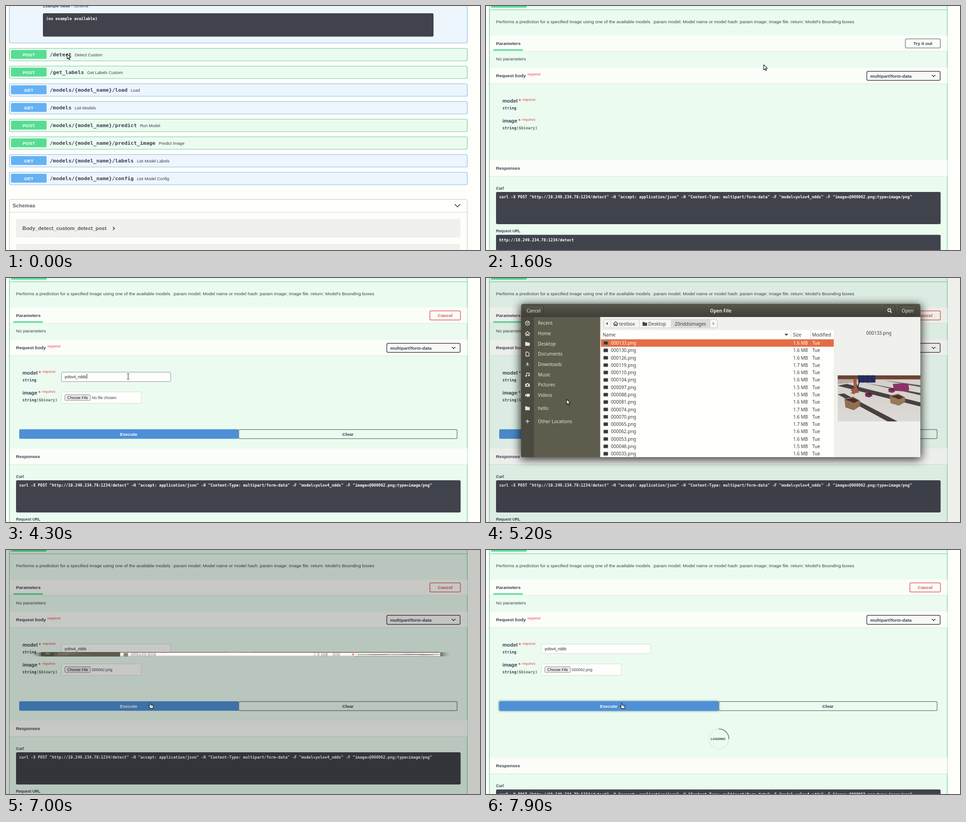
Write an HTML page that moves like this. It is 1040 px wide and 538 px high and loops after 8 s.

```html
<!DOCTYPE html>
<html lang="en">
<head>
<meta charset="utf-8">
<title>API docs demo</title>
<style>
  html, body { margin: 0; width: 100%; height: 100%; overflow: hidden; background: #fefefa; }
  svg { display: block; width: 1040px; height: 538px; font-family: "Liberation Sans", Arial, sans-serif; fill: #3b4151; }
  .b { font-weight: 700; }
  .m { font-family: "DejaVu Sans Mono", monospace; font-weight: 700; }
  .mid { text-anchor: middle; }
  .white { fill: #fff; }
  .req { fill: #ef686b; font-weight: 700; }
  .star { fill: #dc3a3c; font-weight: 700; }
  .ui { font-family: "Noto Sans", "Open Sans", sans-serif; fill: #3c3c3a; }
  .light { fill: #e6e4da; }
  .line { fill: none; stroke-linecap: round; stroke-linejoin: round; }
  .glow { filter: blur(2px); }
  .shadow { filter: blur(10px); }
</style>
</head>
<body>
<svg id="stage" viewBox="0 0 1040 538" xml:space="preserve"></svg>
<script>
const LOOP = 8000, STEP = 100;
const POST = '#57dd93', GET = '#65b1f3', POST_BG = '#ebfbf0', GET_BG = '#edf5fd';
const POST_LINE = '#6bcb9d', GET_LINE = '#82bcea', CODE = '#40434b', PAGE = '#fefefa';

// Markup helpers
const rect = (x, y, w, h, fill, more = '') =>
  `<rect x="${x}" y="${y}" width="${w}" height="${h}" fill="${fill}" ${more}/>`;
const box = (x, y, w, h, fill, stroke, sw = 1, r = 3, more = '') =>
  rect(x, y, w, h, fill, `stroke="${stroke}" stroke-width="${sw}" rx="${r}" ${more}`);
const text = (x, y, s, size, cls = '', more = '') =>
  `<text x="${x}" y="${y}" font-size="${size}" class="${cls}" ${more}>${s}</text>`;
const path = (d, stroke, w = 1.4) => `<path class="line" d="${d}" stroke="${stroke}" stroke-width="${w}"/>`;
const shape = (d, fill) => `<path d="${d}" fill="${fill}"/>`;
const group = (id, body, more = '') => `<g id="${id}" ${more}>${body}</g>`;
const at = (x, y, body) => `<g transform="translate(${x} ${y})">${body}</g>`;

// API page
const ops = [
  ['POST', '/detect', 'Detect Custom'],
  ['POST', '/get_labels', 'Get Labels Custom'],
  ['GET', '/models/{model_name}/load', 'Load'],
  ['GET', '/models', 'List Models'],
  ['POST', '/models/{model_name}/predict', 'Run Model'],
  ['POST', '/models/{model_name}/predict_image', 'Predict Image'],
  ['GET', '/models/{model_name}/labels', 'List Model Labels'],
  ['GET', '/models/{model_name}/config', 'List Model Config']
];

const opHead = ([verb, url, note], y) =>
  rect(11, y + 4, 78, 19.5, verb === 'POST' ? POST : GET, 'rx="2"') +
  text(50, y + 17.5, verb, 9.91, 'b mid white') +
  text(96, y + 18, url, 11.33, 'm') +
  text(103 + url.length * 6.82, y + 17.5, note, 9.2);

const opRow = (op, i) => {
  const y = Math.round(93 + 38.93 * i), post = op[0] === 'POST';
  return box(7.5, y + .5, 1004.5, 27.5, post ? POST_BG : GET_BG, post ? POST_LINE : GET_LINE, 1.2) + opHead(op, y);
};

const exampleBlock = () =>
  box(7.5, -20, 1004.5, 101.5, GET_BG, GET_LINE, 1.2) +
  text(81, 3, 'Example Value', 8.5, 'b') + rect(144, -5, .8, 9, '#b5b9c0') + text(149, 3, 'Schema', 8.5) +
  rect(81, 16, 857, 51.5, CODE, 'rx="3"') +
  text(88, 31, '(no example available)', 8.5, 'm white');

const schemas = () =>
  box(7.5, 426.5, 1004.5, 140, PAGE, '#c6c7c5') + rect(8, 454.5, 1004, 1, '#cfd0ce') +
  text(14.5, 444, 'Schemas', 11.33, 'b', 'fill="#5b5e66"') +
  path('M985 437.5l5.5 5.5 5.5-5.5', '#2b2b2b', 1.5) +
  rect(22, 469.5, 975, 41, '#f0f1ee', 'rx="3"') + rect(22, 524.5, 975, 41, '#f0f1ee', 'rx="3"') +
  text(36, 493.5, 'Body_detect_custom_detect_post', 11.33, 'b', 'fill="#58595d"') +
  path('M235 487.5l3 3-3 3', '#2b2b2b', 1.5);

const band = (y, h, title) =>
  rect(8, y + h, 1004, 1, '#d6e6db') + rect(8, y, 1004, h, '#fbfdf9') + text(22, y + 21, title, 9.91, 'b');

const button = (x, w, y, label, color, ink) =>
  box(x, y, w, 20, 'none', color, 1.5, 2.5) + text(x + w / 2, y + 13.7, label, 9.91, 'b mid', `fill="${ink}"`);

const field = (y, name, width, type, extra = '') =>
  text(36, y, name, 11.33, 'b') + text(38.5 + width, y, '*', 11.33, 'star') +
  text(46.7 + width, y - 4.5, 'required', 7.08, 'req') +
  text(36, y + 14.5, type + `<tspan fill="#666">${extra}</tspan>`, 8.5, 'm');

const detail = () =>
  box(7.5, -19.5, 1004.5, 800, POST_BG, POST_LINE, 1.2) + opHead(ops[0], -20) +
  rect(8, 8, 1004, 1, POST_LINE) +
  text(22, 38, "Performs a prediction for a specified image using one of the available models. :param model: Model name or model hash :param image: Image file :return: Model's Bounding boxes", 9.91) +
  band(65, 34.5, 'Parameters') + rect(16, 95.5, 65, 3, '#4fdb8f') +
  text(22, 120, 'No parameters', 9.91) +
  band(136, 35, 'Request body') + text(91, 153, 'required', 7.08, 'req') +
  box(835.5, 144, 161, 20, '#f8f9f6', '#41444e', 1.5) +
  text(843, 157.5, 'multipart/form-data', 9.91, 'b') + path('M978.5 152.5l3.5 3.3 3.5-3.3', '#2b2b2b') +
  field(213, 'model', 33.4, 'string') + field(257, 'image', 32.7, 'string', '($binary)') +
  group('tryBtn', button(920.2, 76.6, 72.5, 'Try it out', '#858686', '#3b4151')) +
  group('form', form()) + group('lower', responses());

const form = () =>
  button(930, 67, 72.5, 'Cancel', '#dd6464', '#d9585b') +
  box(121.5, 207.5, 240, 21, '#fefefc', '#d6dad6', 1, 2.5, 'id="input"') +
  text(128.5, 220.5, 'model', 8.5, '', 'id="value"') + rect(129, 211, 1, 11, '#222', 'id="caret"') +
  box(121.5, 251, 175.5, 25.5, '#fefefc', '#d6dad6', 1, 2.5) +
  box(129, 257.5, 56, 12.5, '#efefef', '#777', .9, 1.8) + text(157, 266.7, 'Choose File', 8.5, 'mid', 'fill="#111"') +
  text(188.3, 266.5, 'No file chosen', 8.5, '', 'id="file"') +
  rect(28, 333, 483, 22, '#3b5f80', 'id="focus" class="glow" opacity=".7" rx="3"') +
  rect(29, 333.5, 481.5, 21, '#4d90d6', 'rx="2.5"') + text(269, 347.5, 'Execute', 9.91, 'b mid white') +
  button(510.7, 479, 334.2, 'Clear', '#858080', '#3b4151') +
  group('loading',
    '<circle cx="511" cy="416.5" r="22" fill="none" stroke="#dcebe1" stroke-width="1.6"/>' +
    path('M511 394.5A22 22 0 0 1 533 416.5', '#6b716e', 1.6) +
    text(509.3, 418.5, 'LOADING', 7.08, 'b mid'));

const responses = () =>
  band(376, 35, 'Responses') + text(22, 440.5, 'Curl', 8.5, 'b') +
  rect(22, 446, 975.5, 71, CODE, 'rx="3"') +
  text(29, 460, 'curl -X POST "http://10.249.234.78:1234/detect" -H "accept: application/json" -H "Content-Type: multipart/form-data" -F "model=yolov4_ndds" -F "image=@000062.png;type=image/png"', 8.5, 'm white') +
  text(22, 535, 'Request URL', 8.5, 'b') + rect(22, 540.5, 975.5, 36, CODE, 'rx="3"') +
  text(29, 555, 'http://10.249.234.78:1234/detect', 8.5, 'm white');

// File chooser
const FOLDER = 'M-5-4h4l1 1.5h5v7h-10z';
const HOUSE = 'M-5 .5L0-4.5 5 .5M-3.5-.5v5h2.5v-3h2v3h2.5v-5';
const INK = '#e6e4da';
const places = [
  ['Recent', 99.5, path('M4.5 0A4.5 4.5 0 1 1 0-4.5 4.5 4.5 0 0 1 4.5 0M-2-1.5L0 .5 2.5-2', INK)],
  ['Home', 122.3, path(HOUSE, INK)],
  ['Desktop', 145, shape(FOLDER, INK)],
  ['Documents', 167.7, path('M-3.5-4.5h4l3 3v6h-7z', INK)],
  ['Downloads', 190.3, path('M0-4v5M-2.5-.8L0 1.5 2.5-.8M-4 4h.1M0 4h.1M4 4h.1', INK)],
  ['Music', 213, path('M-2 3v-6.5h6v5.5', INK) + `<circle cx="-3.2" cy="3" r="1.8" fill="${INK}"/><circle cx="2.8" cy="2" r="1.8" fill="${INK}"/>`],
  ['Pictures', 235.7, shape('M-5-2.5h2.5l1-1.5h3l1 1.5h2.5v6.5h-10z', INK) + '<circle r="2" cy=".6" fill="#4b4a40"/>'],
  ['Videos', 258.3, shape('M-2-3h7v6.5h-7zM-5-3l2.5 2v2.5l-2.5 2z', INK)],
  ['hello', 287, shape(FOLDER, INK)],
  ['Other Locations', 316, path('M-3.5 0h7M0-3.5v7', INK)]
];
const files = '133 130 126 119 110 104 097 088 081 074 070 065 062 053 048 033'.split(' ');
const sizes = '6667665567676656';
const PITCH = 16.28, PICK = 12;
const pngName = n => `000${n}.png`;

const fileRow = (n, i) => {
  const y = 143.3 + PITCH * i;
  return '<g class="row">' + box(258, y - 3.7, 9.5, 7.4, '#34363a', '#8c8c88', 1, .5) +
    text(274, y + 3.7, pngName(n), 10) + text(674, y + 3.7, `1.${sizes[i]} MB`, 10) + text(716, y + 3.7, 'Tue', 10) + '</g>';
};

const crate = (x, y, w, h, side, inner) =>
  shape(`M${x} ${y}l${w * .55}-${h * .2}L${x + w} ${y + h * .15}v${h * .5}l-${w * .4} ${h * .35}L${x + w * .06} ${y + h * .75}z`, side) +
  shape(`M${x + 2} ${y + h * .06}l${w * .5}-${h * .16} ${w * .36} ${h * .26}-${w * .3} ${h * .2}z`, inner);

const photo = () =>
  rect(0, 0, 182, 102, 'url(#floor)') + rect(0, 0, 182, 9, '#6b4336') + rect(45, 0, 38, 16, '#252d5c') +
  shape('M0 9h45v6l-45 4z', '#b5aaa1') +
  shape('M0 23l20-4 162 41v9z', '#48413f') + shape('M0 42l14-2 118 62h-22z', '#48413f') +
  shape('M62 17l120 22v5z', '#544d4a') + shape('M100 11l82 11v4z', '#615a56') +
  path('M36 41l4-25 4 12 5-20M30 33l15 4M48 0v16M56 0v15M66 0v16M76 0v14', '#1d2752', 2) +
  shape('M34 10l7-3 1 18 5 13-18 3 7-14z', '#a65a3a') +
  shape('M121 19l34-1 2 14-4 4-29-2z', '#8d3268') + crate(60, 40, 16, 9, '#7a2a52', '#4e1d38') +
  crate(111, 30, 15, 9, '#862f5c', '#5b2140') + crate(15, 52, 34, 25, '#8f6e54', '#4a2e25') +
  crate(114, 45, 34, 22, '#9a785c', '#4f3126');

const dialog = () =>
  rect(75, 59, 880, 341, '#000', 'class="shadow" opacity=".8" rx="6"') +
  rect(77, 57, 876, 338, '#403f38', 'rx="5"') + rect(77, 57, 876, 29, 'url(#bar)', 'rx="5"') +
  [[83, 43, 'Cancel'], [874, 23, ''], [906, 38, 'Open']].map(([x, w, s]) =>
    box(x + .5, 60.5, w, 23, 'url(#bar)', '#3b3a34') + text(x + w / 2, 75.7, s, 10, 'mid light')).join('') +
  path('M887.5 74l2 2', INK, 2) + `<circle cx="884.8" cy="71" r="3.2" fill="none" stroke="${INK}" stroke-width="1.7"/>` +
  text(515, 75.7, 'Open File', 10, 'b mid light') +
  rect(77, 86, 28, 309, '#4b4a40') + rect(105, 86, 145.5, 309, '#5d5c4d') +
  places.map(([s, y, icon]) => at(91, y, icon) + text(114, y + 3.7, s, 10, 'light')).join('') +
  rect(250.5, 86, 702.5, 309, '#f0f0ec') +
  box(258.5, 91.5, 249, 18.5, '#f6f6f3', '#c9c8c3') + rect(406, 92, 85, 18, '#dcdbd6') +
  [273, 336, 406, 491].map(x => rect(x, 92, 1, 18, '#cfcec9')).join('') +
  shape('M267 97.5v6l-4-3z', '#444') + shape('M497.5 97.5v6l4-3z', '#999') +
  at(284.5, 100.5, path(HOUSE, '#444')) + at(348.5, 101, shape(FOLDER, '#444')) +
  text(292, 104.5, 'testbox', 10) + text(356, 104.5, 'Desktop', 10) + text(414, 104.5, '20nddsimages', 10) +
  rect(251, 115, 512, 280, '#fefefc') + rect(251, 134.5, 512, .8, '#dcdcd8') +
  rect(669, 115, 1, 20, '#dcdcd8') + rect(712, 115, 1, 20, '#dcdcd8') +
  text(256, 128.8, 'Name', 10) + text(673.5, 128.8, 'Size', 10) + text(715.5, 128.8, 'Modified', 10) +
  shape('M655 123h8l-4 4.5z', '#444') +
  rect(252, 135.3, 511, PITCH, '#e46d45', 'id="mark"') + files.map(fileRow).join('') +
  rect(760, 135.5, 3, 207, '#e58a68', 'id="thumb"') +
  text(862, 125.3, '', 10, 'mid', 'id="title"') +
  at(771.5, 214.5, `<g clip-path="url(#frame)">${group('photo', photo())}</g>`);

// Pointers
const arrow = '<path d="M0 0V11.3L2.7 8.9 4.5 13 6.3 12.2 4.5 8.2H8.2Z" fill="#fff" stroke="#111" stroke-width="1.1" stroke-linejoin="round"/>';
const hand = '<path d="M3.2 7.5V1.3a1.1 1.1 0 0 1 2.2 0V5l5 .9q1.3.3 1.2 1.7l-.5 3-.7 2H4.8L1 8.2q-.3-1.5 1-1.3z" fill="#fff" stroke="#111" stroke-width="1.1" stroke-linejoin="round"/><path d="M6 7v2M8 7.2v2M10 7.4v2" stroke="#111" stroke-width=".7"/>';
const beam = '<path d="M-2.5-6H-.7L0-5.4.7-6H2.5M0-5.4V5.4M-2.5 6H-.7L0 5.4.7 6H2.5" fill="none" stroke="#222"/>';

const track = [
  [0, 134, 105.5, 'arrow'], [400, 63, 94, 'hand'], [500, 63, 94, 'hand'], [700, 62, 96, 'hand'],
  [800, 62, 96, 'hand'], [900, 61, 98, 'hand'], [1000, 61, 98, 'hand'], [1100, 235.5, 157, 'arrow'],
  [1700, 684, 124, 'arrow'], [1800, 684, 124, 'arrow'], [2100, 931, 80, 'hand'], [2300, 931, 80, 'hand'],
  [2400, 860, 100, 'arrow'], [2700, 585.5, 178, 'arrow'], [3100, 269, 216, 'beam'], [3400, 269, 216, 'beam'],
  [3500, 269, 217, 'beam'], [4000, 269, 217, 'beam'], [4100, 268, 217, 'beam'], [4500, 268, 217, 'beam'],
  [4600, 240, 233, 'arrow'], [4800, 177, 267.5, 'arrow'], [5400, 177, 267.5, 'arrow'],
  [6400, 315.5, 337.5, 'arrow'], [6700, 315.5, 337.5, 'arrow'], [6900, 312, 336.5, 'hand'],
  [7200, 312, 336.5, 'hand'], [7500, 293.5, 337, 'hand'], [8000, 293.5, 337, 'hand']
];

const stage = document.getElementById('stage');
stage.innerHTML = `<defs>
  <linearGradient id="bar" x2="0" y2="1"><stop stop-color="#59584d"/><stop offset="1" stop-color="#403f38"/></linearGradient>
  <linearGradient id="floor" x2="0" y2="1"><stop stop-color="#d3cec8"/><stop offset="1" stop-color="#dcdad7"/></linearGradient>
  <clipPath id="frame"><rect width="181.5" height="102"/></clipPath></defs>` +
  rect(0, 0, 1040, 538, PAGE) +
  group('list', ops.map(opRow).join('') + schemas()) +
  group('scroll', group('detail', detail()) + at(0, -113, exampleBlock())) +
  rect(0, 0, 1040, 538, '#000', 'id="dim"') +
  group('dialog', dialog(), 'class="ui"') +
  group('pointer', group('arrow', arrow) + group('hand', hand) + group('beam', beam));

const $ = id => document.getElementById(id);
const set = (id, name, value) => $(id).setAttribute(name, value);
const show = (id, on) => set(id, 'display', on ? 'inline' : 'none');
const move = (id, x, y) => set(id, 'transform', `translate(${x} ${y})`);
const ramp = (t, a, b) => Math.min(1, Math.max(0, (t - a) / (b - a)));
const rows = [...document.querySelectorAll('.row')];

function pointerAt(t) {
  const next = track.findIndex(k => k[0] > t);
  const a = track[next - 1], b = track[next], k = ramp(t, a[0], b[0]);
  return [a[1] + (b[1] - a[1]) * k, a[2] + (b[2] - a[2]) * k, a[3]];
}

function render(t) {
  const open = t >= 1100, editing = t >= 2300, loading = t >= 7900;
  show('list', !open);
  show('detail', open);
  move('scroll', 0, Math.round(113 * (1 - ramp(t, 1200, 1600))));

  show('tryBtn', !editing);
  show('form', editing);
  show('loading', loading);
  move('lower', 0, loading ? 82 : editing ? 0 : -36);

  const typed = t >= 4300, focused = t >= 3200 && t < 4800;
  $('value').textContent = typed ? 'yolov4_ndds' : 'model';
  set('value', 'fill', typed ? '#222' : '#777');
  $('file').textContent = t >= 6800 ? '000062.png' : 'No file chosen';
  set('input', 'stroke', focused ? '#8f9490' : '#d6dad6');
  show('caret', focused && (t < 3800 || typed));
  set('caret', 'x', typed ? 177 : 129);
  show('focus', t >= 7600);

  // The dialog unfolds and folds vertically while the page dims more slowly
  set('dim', 'opacity', .32 * (ramp(t, 4950, 6300) - ramp(t, 6700, 7600)));
  const grow = ramp(t, 4850, 5150) * (1 - ramp(t, 6700, 7008));
  show('dialog', grow > 0);
  set('dialog', 'transform', `translate(0 ${230 * (1 - grow)}) scale(1 ${grow})`);

  const sel = t >= 6600 ? PICK : 0;
  set('mark', 'y', 135.3 + PITCH * sel);
  rows.forEach((r, i) => r.setAttribute('fill', i === sel ? '#fff' : '#3c3c3a'));
  $('title').textContent = pngName(files[sel]);
  set('photo', 'transform', sel ? 'translate(181.5 0) scale(-1 1)' : '');

  const [x, y, kind] = pointerAt(t);
  show('thumb', t > 5400 && x > 252);
  move('pointer', x, y);
  for (const k of ['arrow', 'hand', 'beam']) show(k, k === kind);
}

let last = -1;
function tick() {
  const t = Math.floor(performance.now() % LOOP / STEP) * STEP;
  if (t !== last) render(last = t);
  requestAnimationFrame(tick);
}
tick();
</script>
</body>
</html>
```
